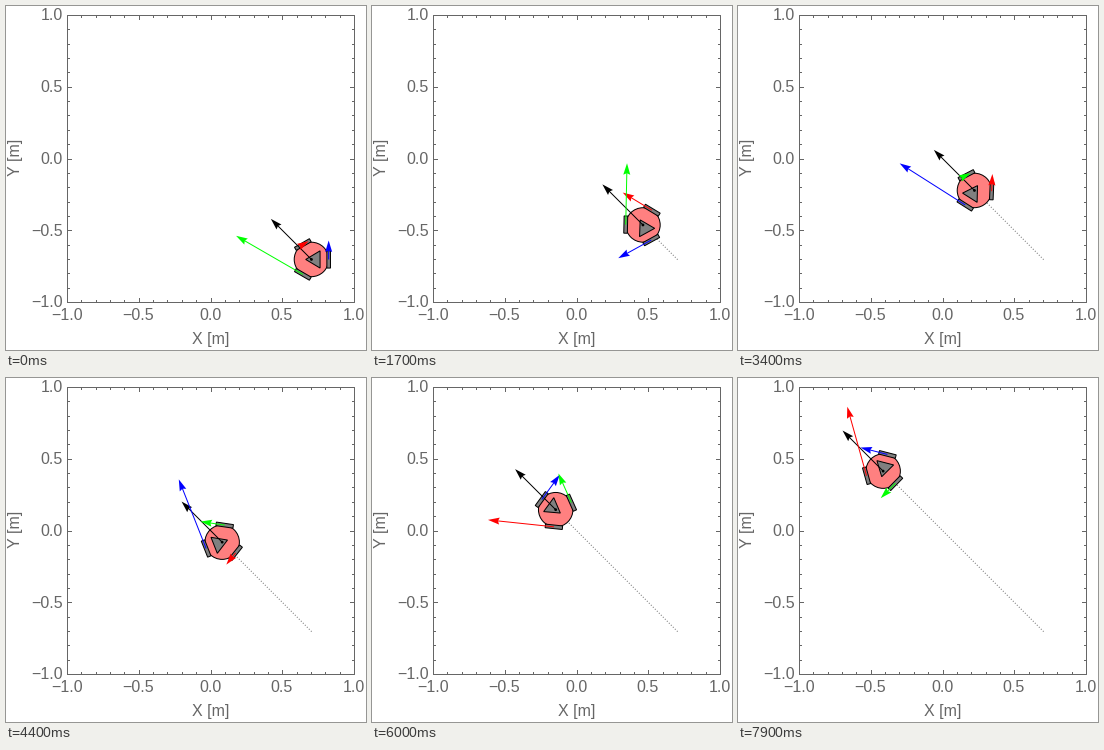
Write a matplotlib script that moves like this. It is 360 by 344 pixels and loops after 8000 ms.

```python
import numpy as np
import matplotlib.pyplot as plt
from matplotlib.animation import FuncAnimation
from matplotlib.patches import Circle, Polygon

W, H, DPI = 360, 344, 100
PT = 72 / DPI                      # points per pixel
SCALE, CX, CY = 143.5, 205, 153    # metres to pixels
GRAY = "#666666"

FRAMES, STEP = 80, 0.1
START = np.array([0.7, -0.7])
VEL = 0.2 * np.array([-1, 1]) / np.sqrt(2)
OMEGA = -2 * np.pi / 10
RADIUS = 0.12
WHEEL = [(-0.0125, -0.06), (0.0125, -0.06), (0.0125, 0.06), (-0.0125, 0.06)]
BODY_MARK = [(-0.04, 0), (0.06, 0.06), (0.06, -0.06)]
COLORS = ["#0000ff", "#ff0000", "#00ff00"]

plt.rcParams["font.family"] = "Liberation Sans"
plt.rcParams["path.snap"] = False
fig = plt.figure(figsize=(W / DPI, H / DPI), dpi=DPI, facecolor="white")
ax = fig.add_axes([0, 0, 1, 1])
ax.set(xlim=(0, W), ylim=(H, 0))
ax.axis("off")


def px(p):
    """Metres to stage pixels."""
    return np.asarray(p) * [SCALE, -SCALE] + [CX, CY]


def rotate(pts, angle):
    c, s = np.cos(angle), np.sin(angle)
    return np.asarray(pts) @ np.array([[c, s], [-s, c]])


def stroke(xs, ys, color, width=1, **kw):
    return ax.plot(xs, ys, color=color, lw=width * PT, **kw)[0]


def shape(pts, color, z, lw=1):
    return ax.add_patch(Polygon(pts, fc=color, ec="black", lw=lw * PT,
                                zorder=z, joinstyle="miter"))


def label(x, y, text, **kw):
    ax.text(x, y, text, size=16 * PT, color=GRAY, va="baseline",
            rotation_mode="anchor", **kw)


def draw_frame():
    lo_x, hi_y = px((-1, 1))
    hi_x, lo_y = px((1, -1))
    stroke([lo_x, hi_x, hi_x, lo_x, lo_x], [lo_y, lo_y, hi_y, hi_y, lo_y], GRAY,
           solid_joinstyle="miter")
    for k in range(-10, 11):
        x, y = px((k / 10, k / 10))
        tx, ty = np.floor([x, y]) + 0.5    # ticks sit on whole pixels
        size = 4.5 if k % 5 == 0 else 2.5
        for edge, d in ((lo_y, -size), (hi_y, size)):
            stroke([tx, tx], [edge, edge + d], GRAY, solid_capstyle="butt")
        for edge, d in ((lo_x, size), (hi_x, -size)):
            stroke([edge, edge + d], [ty, ty], GRAY, solid_capstyle="butt")
        if k % 5 == 0:
            text = f"{k / 10:.1f}".replace("-", "\u2212")
            label(x - 0.8, 314, text, ha="center")
            label(57, y + 4.8, text, ha="right")
    label(204.2, 338, "X [m]", ha="center")
    label(14, 151, "Y [m]", ha="center", rotation=90)


class Arrow:
    HEAD = np.array([(0, 0), (-11.5, 3.5), (-10, 0), (-11.5, -3.5)])

    def __init__(self, color, z):
        self.line = stroke([], [], color, zorder=z, solid_capstyle="butt")
        self.head = shape(self.HEAD, color, z, lw=0)

    def set(self, tail, vec):
        a, b = px(tail), px(np.add(tail, vec))
        d = b - a
        size = np.hypot(*d)
        end = a + d * max(0, 1 - 9 / max(size, 1e-6))
        self.line.set_data([a[0], end[0]], [a[1], end[1]])
        self.head.set_xy(rotate(self.HEAD, np.arctan2(d[1], d[0])) + b)


draw_frame()
trail = stroke([], [], "black", 0.75, zorder=3, dashes=(1, 2.77),
               dash_capstyle="butt")
body = ax.add_patch(Circle((0, 0), RADIUS * SCALE, fc="#ff8080", ec="black",
                           lw=PT, zorder=4))
wheels = [shape(WHEEL, "#808080", 5) for _ in COLORS]
mark = shape(BODY_MARK, "#808080", 6)
dot = ax.add_patch(Circle((0, 0), 1.4, fc="black", lw=0, zorder=7))
heading = Arrow("black", 8)
wheel_arrows = [Arrow(c, 9) for c in COLORS]


def update(i):
    t = i * STEP
    pos, turn = START + VEL * t, OMEGA * t
    body.center = dot.center = tuple(px(pos))
    trail.set_data(*px([START, pos]).T)
    mark.set_xy(px(rotate(BODY_MARK, turn) + pos))
    heading.set(pos, 2 * VEL)
    for k, (wheel, arrow) in enumerate(zip(wheels, wheel_arrows)):
        a = turn + k * 2 * np.pi / 3
        hub = pos + RADIUS * np.array([np.cos(a), np.sin(a)])
        tangent = np.array([-np.sin(a), np.cos(a)])
        wheel.set_xy(px(rotate(WHEEL, a) + hub))
        arrow.set(hub, 2 * (VEL @ tangent + OMEGA * RADIUS) * tangent)
    return []


anim = FuncAnimation(fig, update, frames=FRAMES, interval=1000 * STEP,
                     repeat=True, repeat_delay=0, blit=False)
plt.show()
```
